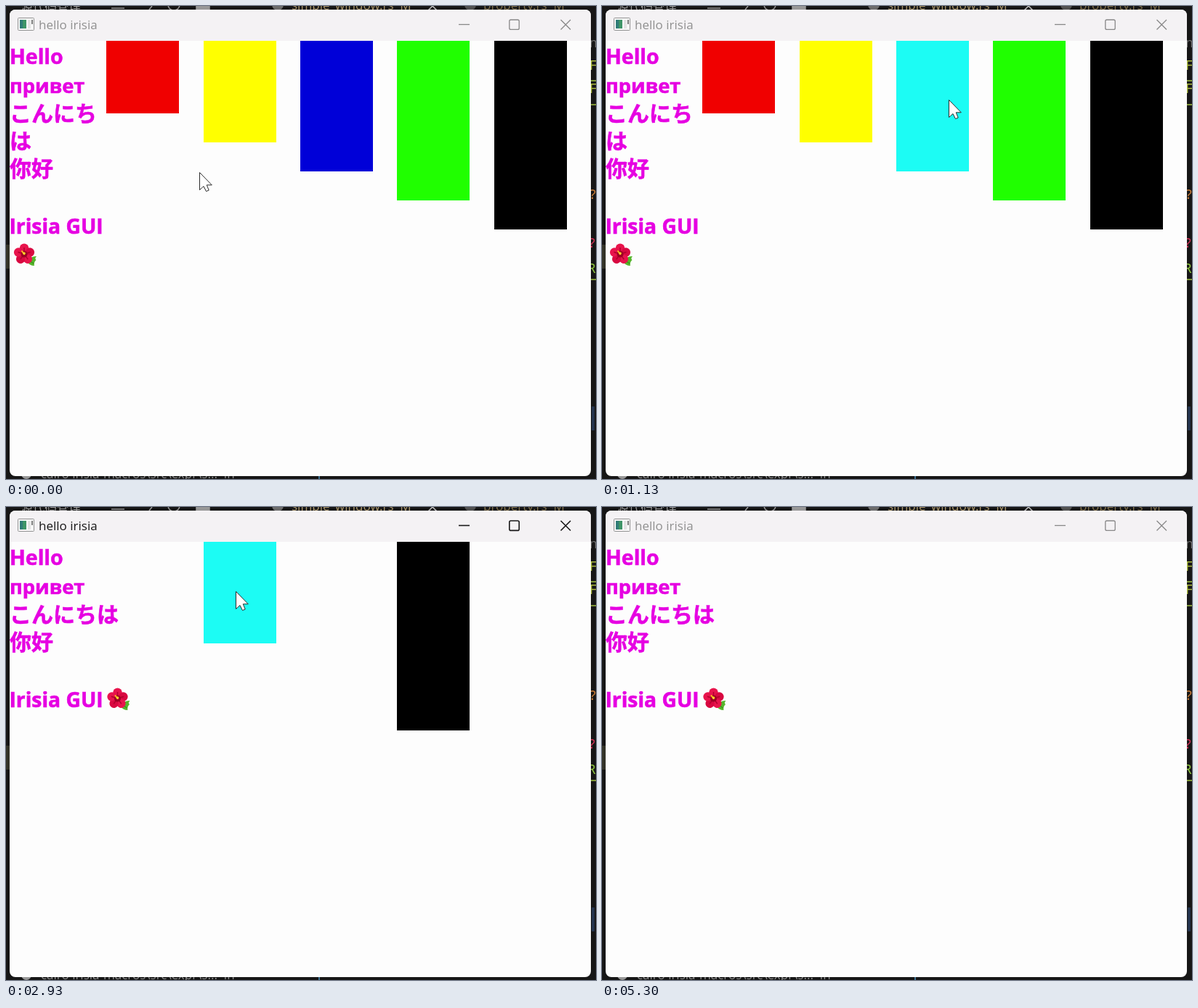
Animation of 812 by 652 pixels, one loop 5330 ms. Source, as an HTML page:

```html
<!DOCTYPE html>
<html lang="en">
<head>
<meta charset="utf-8">
<title>hello irisia</title>
<style>
html, body { margin: 0; width: 100%; height: 100%; overflow: hidden; background: #161616; }
svg { display: block; width: 812px; height: 652px; }
text { white-space: pre; }
.ui { font-family: "Open Sans", "Noto Sans", sans-serif; }
.mono { font-family: "Noto Sans Mono", monospace; }
.cjk { font-family: "Noto Sans CJK JP", "Noto Sans CJK SC", "Noto Sans CJK", sans-serif; }
.greet { font-weight: 700; fill: #e600e2; stroke: #e600e2; stroke-width: .6; }
</style>
</head>
<body>
<svg viewBox="0 0 812 652" xmlns="http://www.w3.org/2000/svg">
  <rect width="812" height="652" fill="#161616"/>

  <!-- editor showing around the window -->
  <rect y="329" width="6" height="33" fill="#333328"/>
  <g fill="#989898" font-size="17">
    <text class="cjk" x="20" y="7" font-size="16.6">源代码管理</text>
    <path d="M145 3h18M197 5l4-5M262 0h18v5h-18z" stroke="#989898" stroke-width="1.5"/>
    <circle cx="231" cy="-2" r="8" fill="none" stroke="#989898" stroke-width="1.5"/>
    <circle cx="374" cy="-2" r="8" fill="#6c6c6c"/>
    <circle cx="639" cy="-2" r="8" fill="#505050"/>
    <text class="ui" x="393" y="5" fill="#a8946a">simple_window.rs  M</text>
    <path d="M581 -6L593 6M593 -6L581 6" stroke="#c0c0c0" stroke-width="1.5"/>
    <text class="ui" x="657" y="5" fill="#80704c">property.rs  M</text>
    <circle cx="28" cy="645" r="7"/>
    <text class="ui" x="48" y="651" fill="#909090">cairo irisia-macros\src\expr\s...  in</text>
    <path d="M431 647v5" stroke="#3d7090" stroke-width="2"/>
  </g>
  <g class="mono" font-size="18">
    <text x="803" y="57" fill="#707070">n</text>
    <text x="803" y="88" fill="#b0c040">F</text>
    <text x="803" y="120" fill="#b0c040">F</text>
    <text x="802" y="266" fill="#d08038">?</text>
    <text x="801" y="333" fill="#d83058">?</text>
    <text x="801" y="368" fill="#90c840">R</text>
    <path d="M804 103h8M804 136h8M804 377h8" stroke="#a0c040" stroke-width="1.5"/>
    <path d="M808 552v33" stroke="#24344d" stroke-width="4"/>
  </g>

  <!-- window -->
  <rect x="5" y="5" width="800" height="643" rx="8" fill="#fdfdfd"/>
  <path d="M5 48V13a8 8 0 0 1 8-8H797a8 8 0 0 1 8 8V48z" fill="#f4f2f4"/>
  <rect x="16.5" y="16.5" width="22" height="17" rx="1" fill="#f8f8f8" stroke="#929292"/>
  <rect x="19" y="19" width="9" height="12" fill="#3f9568"/>
  <rect x="19" y="19" width="4" height="12" fill="#317c78"/>
  <rect x="30" y="19" width="4" height="12" fill="#e3e3e3"/>
  <path d="M36 19v6" stroke="#555" stroke-width="1.5"/>
  <text id="title" class="ui" x="45" y="32" font-size="17">hello irisia</text>
  <g id="buttons" fill="none">
    <path d="M623 25.5h15"/>
    <rect x="692.8" y="19" width="13.4" height="13.4" rx="2"/>
    <path d="M763.5 19L777 32.5M777 19L763.5 32.5"/>
  </g>

  <g id="bars"></g>

  <g class="greet">
    <text class="ui" x="5" y="80" font-size="28.5">Hello</text>
    <text class="ui" x="5" y="120" font-size="27.3">привет</text>
    <text id="kana" class="cjk" x="5" y="158.5" font-size="30"></text>
    <text id="wrapped" class="cjk" x="5" y="196.5" font-size="30">は</text>
    <g id="lower">
      <text class="cjk" x="5" y="196.5" font-size="30" lang="zh">你好</text>
      <text class="ui" x="4.5" y="276" font-size="28.3">Irisia GUI</text>
    </g>
  </g>
  <g id="flower">
    <path d="M4 10Q10 2 17 3Q14 6 16.5 8Q13 11 14 16Q7 16 4 10z" fill="#55b52c"/>
    <path d="M7 9L13 13" stroke="#308018"/>
    <g id="petals"></g>
    <circle r="4.5" fill="#9c0024"/>
    <path d="M0 0L-3 -4" stroke="#ffc020" stroke-width="2" stroke-linecap="round"/>
    <circle cy="-1" r="1.8" fill="#ffd52c"/>
  </g>

  <path id="cursor" d="M.5 .5V24.5L6 19.5L9.5 26.5L13.2 25L10.3 17.8H17.3z" fill="#fff" stroke="#2c2c2c" stroke-linejoin="round"/>
</svg>
<script>
const LOOP = 5330;
const LEFT = 5, TOP = 48, WIDTH = 800, BAR = 100;
const NS = "http://www.w3.org/2000/svg";
const el = id => document.getElementById(id);

function add(parent, tag, attrs) {
  const node = document.createElementNS(NS, tag);
  set(node, attrs);
  return parent.appendChild(node);
}
function set(node, attrs) {
  for (const k in attrs) node.setAttribute(k, attrs[k]);
}

// gone: time of the click that removes the bar
const bars = [
  { color: "#f00000", h: 100, gone: 2730 },
  { color: "#ffff00", h: 140, gone: 3170 },
  { color: "#0000d8", h: 180, gone: 1230 },
  { color: "#20ff00", h: 220, gone: 1970 },
  { color: "#000000", h: 260, gone: 4000 }
];
const HOVER = "#1cfcf4";
const ACTIVE = [1230, 5270];
const EXIT = 4470;

// pointer stops: time, x, y
const stops = [
  [0, 266, 229], [30, 266, 229], [300, 180, 175], [530, 64, 112],
  [570, 64, 112], [770, 568, 78], [890, 712, 92], [1100, 490, 126],
  [1230, 455, 134], [1400, 455, 132], [1630, 521, 128], [1670, 549, 129],
  [1700, 543, 130], [1970, 543, 130], [2070, 540, 132], [2430, 461, 144],
  [2500, 425, 144], [2650, 268, 138], [2730, 252, 134], [2930, 316, 116],
  [3030, 324, 112], [3170, 324, 112], [3500, 436, 124], [3670, 448, 127],
  [4000, 448, 127], [4100, 452, 160], [EXIT, 520, 660], [LOOP, 520, 660]
];

// monotone cubic, so holds stay still
function rate(i, k) {
  const a = stops[i - 1], b = stops[i], c = stops[i + 1];
  if (!a || !c) return 0;
  const p = (b[k] - a[k]) / (b[0] - a[0]);
  const q = (c[k] - b[k]) / (c[0] - b[0]);
  return p * q > 0 ? 2 * p * q / (p + q) : 0;
}
function pointer(t) {
  let i = 0;
  while (i < stops.length - 2 && t >= stops[i + 1][0]) i++;
  const a = stops[i], b = stops[i + 1], d = b[0] - a[0];
  const u = (t - a[0]) / d, v = 1 - u;
  return [1, 2].map(k =>
    a[k] * v * v * (1 + 2 * u) + b[k] * u * u * (3 - 2 * u) +
    d * u * v * (v * rate(i, k) - u * rate(i + 1, k)));
}

for (const b of bars) b.node = add(el("bars"), "rect", { y: TOP, width: BAR, height: b.h });
for (let i = 0; i < 5; i++) {
  const g = add(el("petals"), "g", { transform: `rotate(${i * 72})` });
  add(g, "ellipse", { cy: -8.5, rx: 6.2, ry: 6, fill: i % 2 ? "#d80840" : "#e8144c" });
  add(g, "path", { d: "M0 -3V-9", stroke: "#b0002c", "stroke-width": 1.5 });
}

function draw(t) {
  const [x, y] = pointer(t);
  const shown = bars.filter(b => t < b.gone);
  const column = WIDTH / (shown.length + 1);

  for (const b of bars) {
    const i = shown.indexOf(b);
    if (i < 0) { set(b.node, { visibility: "hidden" }); continue; }
    const bx = Math.round(LEFT + column * (i + 1));
    const over = x >= bx && x < bx + BAR && y >= TOP && y < TOP + b.h;
    set(b.node, { x: bx, fill: over ? HOVER : b.color, visibility: "visible" });
  }

  const narrow = column < 150;
  const shift = narrow ? 38 : 0;
  el("kana").textContent = narrow ? "こんにち" : "こんにちは";
  set(el("wrapped"), { visibility: narrow ? "visible" : "hidden" });
  set(el("lower"), { transform: `translate(0 ${shift})` });
  set(el("flower"), {
    transform: column < 170 ? `translate(25 ${304 + shift})` : "translate(153.5 264)"
  });

  const active = t >= ACTIVE[0] && t < ACTIVE[1];
  set(el("title"), { fill: active ? "#181818" : "#909090" });
  set(el("buttons"), {
    stroke: active ? "#181818" : "#888888",
    "stroke-width": active ? 1.6 : 1.3
  });
  set(el("cursor"), {
    transform: `translate(${Math.round(x)} ${Math.round(y)})`,
    visibility: t < EXIT ? "visible" : "hidden"
  });
}

const start = performance.now();
function tick() {
  draw((performance.now() - start) % LOOP);
  requestAnimationFrame(tick);
}
tick();
</script>
</body>
</html>
```
